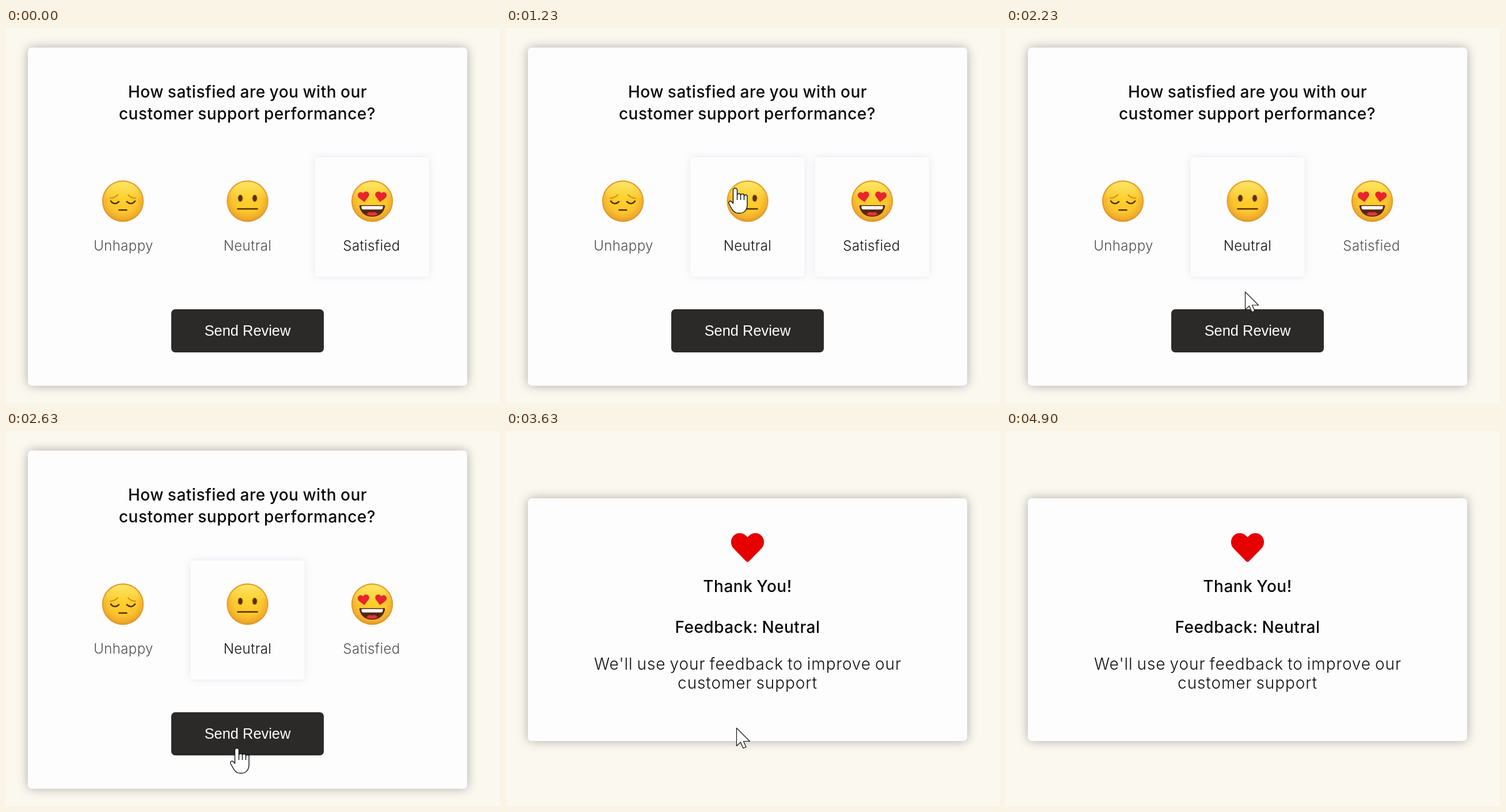
Write an HTML page that moves like this. It is 858 px wide and 652 px high and loops after 4930 ms.

```html
<!DOCTYPE html>
<html lang="en">
<head>
<meta charset="utf-8">
<title>Feedback form</title>
<style>
  html, body { margin: 0; width: 100%; height: 100%; overflow: hidden; background: #fbf8f0; }
  svg { display: block; }
  text { font-family: Inter, "Open Sans", sans-serif; text-anchor: middle; }
  .title { font-size: 28px; font-weight: 500; letter-spacing: .5px; word-spacing: -1px; fill: #080808; }
  .body { font-size: 28px; font-weight: 300; letter-spacing: .9px; word-spacing: -1.6px; fill: #111; }
  .label { font-size: 24px; font-weight: 300; letter-spacing: .4px; fill: #505050; }
  .on .label { fill: #111; }
  .send { font: 25.4px "Liberation Sans", Arial, sans-serif; fill: #fff; }
  .panel { fill: #fdfdfd; filter: drop-shadow(0 0 9px rgba(0, 0, 0, .3)); }
  .card { fill: #fdfdfd; filter: drop-shadow(0 0 7px rgba(50, 50, 150, .1)); }
  .line { fill: none; stroke: #57300a; stroke-width: 2.6; stroke-linecap: round; }
  .brow { stroke: #d18d20; stroke-width: 2; }

  /* hard switches */
  .ask, .thanks, .on, .off, .arrow, .hand, .button {
    animation: 4930ms step-end infinite;
  }
  .ask { animation-name: ask; }
  .thanks { animation-name: thanks; }
  .neutral.on { animation-name: hover; }
  .neutral.off { animation-name: unhover; }
  .satisfied.on { animation-name: chosen; }
  .satisfied.off { animation-name: dropped; }
  .arrow { animation-name: arrow; }
  .hand { animation-name: hand; }
  .button { animation-name: press; transform-origin: 419.5px 526.5px; }
  .pointer { animation: move 4930ms linear infinite; }

  @keyframes ask { 0% { opacity: 1 } 64.91%, 100% { opacity: 0 } }
  @keyframes thanks { 0% { opacity: 0 } 64.91%, 100% { opacity: 1 } }
  @keyframes hover { 0% { opacity: 0 } 18.38%, 100% { opacity: 1 } }
  @keyframes unhover { 0% { opacity: 1 } 18.38%, 100% { opacity: 0 } }
  @keyframes chosen { 0% { opacity: 1 } 35.5%, 100% { opacity: 0 } }
  @keyframes dropped { 0% { opacity: 0 } 35.5%, 100% { opacity: 1 } }
  @keyframes press { 0% { transform: none } 59.84%, 100% { transform: scale(.977) } }
  @keyframes arrow {
    0% { opacity: 0 } 4.06% { opacity: 1 } 12.17% { opacity: 0 }
    17.65% { opacity: 1 } 18.38% { opacity: 0 }
    44.26% { opacity: 1 } 47.4% { opacity: 0 }
    64.91% { opacity: 1 } 92.29%, 100% { opacity: 0 }
  }
  @keyframes hand {
    0% { opacity: 0 } 12.17% { opacity: 1 } 17.65% { opacity: 0 }
    18.38% { opacity: 1 } 44.26% { opacity: 0 }
    47.4% { opacity: 1 } 64.91%, 100% { opacity: 0 }
  }
  @keyframes move {
    0%, 4.06% { transform: translate(775px, 652px); animation-timing-function: ease-out }
    11.56% { transform: translate(686px, 397px) }
    23.33%, 38.54% { transform: translate(398px, 278px) }
    45.23% { transform: translate(415px, 458px) }
    51.72%, 64.9% { transform: translate(401px, 551px) }
    64.91%, 100% { transform: translate(400px, 516px) }
  }
</style>
</head>
<body>
<svg width="858" height="652" viewBox="0 0 858 652">
  <defs>
    <radialGradient id="skin" cx=".5" cy=".42" r=".6">
      <stop offset="0" stop-color="#fdd22c"/>
      <stop offset=".6" stop-color="#fbc62c"/>
      <stop offset=".86" stop-color="#efab2c"/>
      <stop offset="1" stop-color="#dd8f22"/>
    </radialGradient>
    <linearGradient id="shine" x1="0" y1="0" x2="0" y2="1">
      <stop offset="0" stop-color="#fff27a" stop-opacity=".75"/>
      <stop offset=".45" stop-color="#fff27a" stop-opacity="0"/>
    </linearGradient>
    <g id="face">
      <circle r="35.3" fill="url(#skin)" stroke="#de9526" stroke-width="1.6"/>
      <circle r="33.5" fill="url(#shine)"/>
    </g>
    <path id="heart" d="M206 31C151-16 70-8 20 44L0 65l-20-21C-70-8-151-16-206 31c-63 53-66 150-10 208L-23 438c13 13 33 13 46 0L216 239c56-58 53-155-10-208z"/>
    <rect id="tile" class="card" x="-99" y="-76" width="198" height="207" rx="5"/>

    <g id="sad">
      <use href="#face"/>
      <path class="line" d="M-21 0q6.5 8 14 1M7 1q7.5 7 14-1M-6.500 15.500h13"/>
      <path class="line brow" d="M-22-5q8-.5 13-6M22-5q-8-.5-13-6"/>
    </g>
    <g id="flat">
      <use href="#face"/>
      <ellipse cx="-12.5" cy="-5" rx="4" ry="6" fill="#57300a"/>
      <ellipse cx="12.5" cy="-5" rx="4" ry="6" fill="#57300a"/>
      <path class="line" d="M-17 13.500h34"/>
    </g>
    <g id="love">
      <use href="#face"/>
      <use href="#heart" fill="#e8252d" transform="translate(-16 -16) rotate(-8) scale(.039)"/>
      <use href="#heart" fill="#e8252d" transform="translate(16 -16) rotate(8) scale(.039)"/>
      <path fill="#57260f" d="M-20 7H20c2 0 3 1 2 3.500C19 22 11 27 0 27s-19-5-22-16.500C-23 8-22 7-20 7z"/>
      <path fill="#fff" d="M-18.500 8.500h37q1 6-3.500 6h-30q-4.500 0-3.500-6z"/>
      <path fill="#e0353f" d="M-10 23Q-5 17 0 20Q5 17 10 23Q0 28-10 23z"/>
    </g>
  </defs>

  <g class="ask">
    <rect class="panel" x="38" y="34" width="763" height="588" rx="7"/>
    <text class="title" x="419.5" y="120.5">How satisfied are you with our</text>
    <text class="title" x="419" y="158.5">customer support performance?</text>

    <g transform="translate(203 301)">
      <use href="#sad"/>
      <text class="label" x="1" y="86">Unhappy</text>
    </g>
    <g transform="translate(419.5 301)">
      <g class="neutral off"><text class="label" y="86">Neutral</text></g>
      <g class="neutral on">
        <use href="#tile"/>
        <text class="label" y="86">Neutral</text>
      </g>
      <use href="#flat"/>
    </g>
    <g transform="translate(636 301)">
      <g class="satisfied off"><text class="label" x="-1" y="86">Satisfied</text></g>
      <g class="satisfied on">
        <use href="#tile"/>
        <text class="label" x="-1" y="86">Satisfied</text>
      </g>
      <use href="#love"/>
    </g>

    <g class="button">
      <rect x="287" y="489" width="265" height="75" rx="7" fill="#2b2a29"/>
      <text class="send" x="419.5" y="534.5">Send Review</text>
    </g>
  </g>

  <g class="thanks">
    <rect class="panel" x="38" y="117" width="763" height="422" rx="7"/>
    <use href="#heart" fill="#e60000" transform="translate(419.5 177.5) scale(.112)"/>
    <text class="title" x="419.5" y="279.5">Thank You!</text>
    <text class="title" x="419.5" y="351">Feedback: Neutral</text>
    <text class="body" x="420" y="415">We'll use your feedback to improve our</text>
    <text class="body" x="419.5" y="448">customer support</text>
  </g>

  <g class="pointer" fill="#fff" stroke="#111" stroke-linejoin="round">
    <path class="arrow" stroke-width="1.2" d="M.5.5V31.500L7.500 25 12 35.500 17 33.500 12.500 23.500H23.500z"/>
    <g class="hand" stroke-width="1.4">
      <path d="M-3.500 27V4a3.500 3.500 0 0 1 7 0v9a3 3 0 0 1 6 0a3 3 0 0 1 6 1a2.800 2.800 0 0 1 5.500 2V29c0 9-5 15-13 15h-2c-7 0-10-4-12-8l-4.500-8c-2-4 1.500-6.500 4.500-4z"/>
      <path fill="none" d="M3.500 13v8M9.500 13v8M15.500 14v7"/>
    </g>
  </g>
</svg>
</body>
</html>
```
